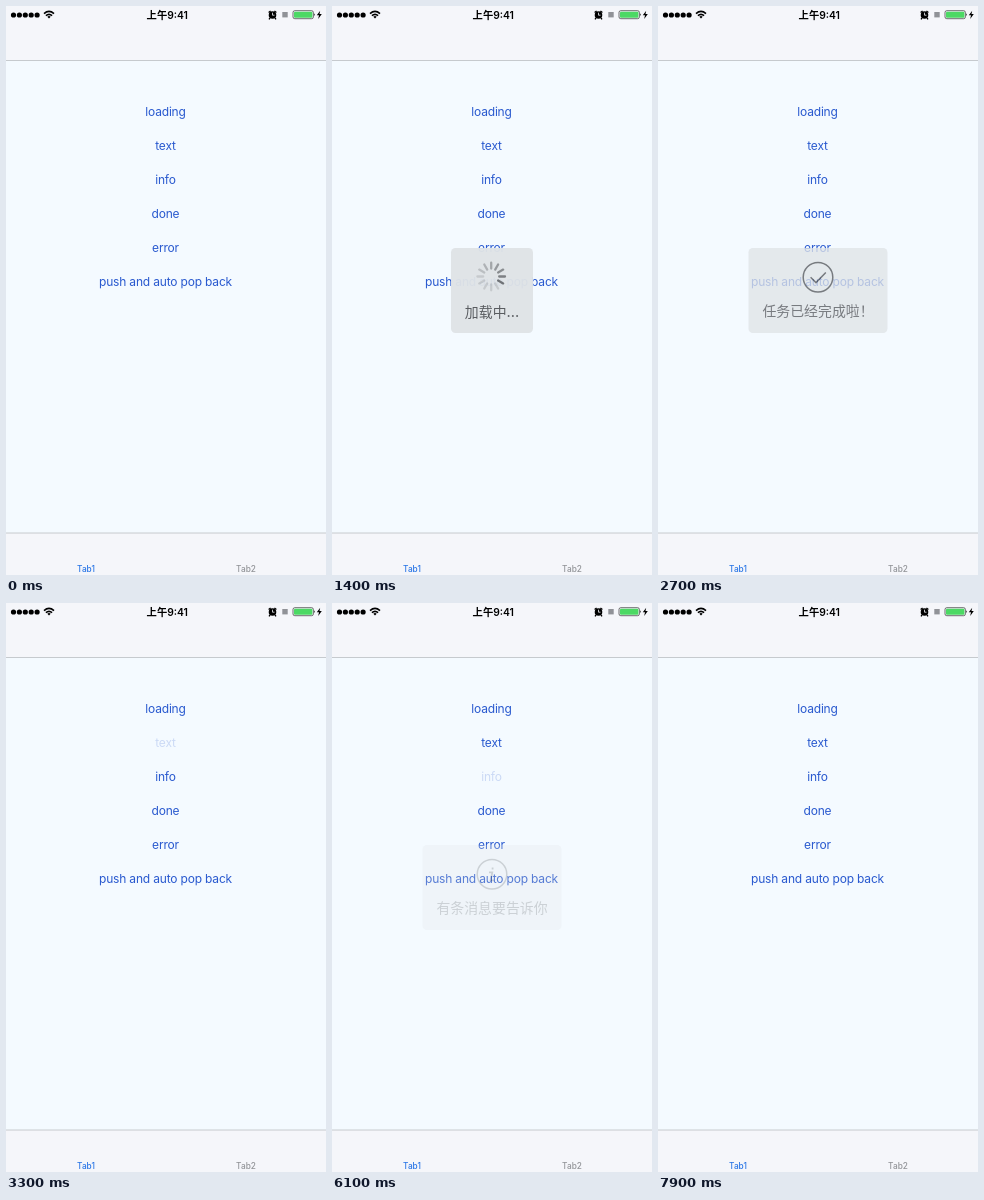
These frames come from a looping animation (320 px wide and 569 px high, 8000 ms). An HTML page:

```html
<!DOCTYPE html>
<html lang="zh">
<head>
<meta charset="utf-8">
<title>Toast demo</title>
<style>
html, body { margin: 0; height: 100%; overflow: hidden; background: #f4faff; }
svg { display: block; width: 100vw; height: 100vh; }
text { font-family: Inter, "Noto Sans CJK SC", "Noto Sans CJK", sans-serif; text-anchor: middle; }
#rows text { font-size: 12px; letter-spacing: -.18px; fill: #2959cf; }
.tab { font-size: 8.3px; font-weight: 500; }
.hud { opacity: 0; }
.hud > rect { fill: #dfe3e7; fill-opacity: .96; }
.hud text { font-size: 13.9px; font-weight: 500; fill: #595c60; }
.hud .plain { font-size: 13.1px; font-weight: 600; }
.icon { fill: none; stroke: #595c60; stroke-width: 1.5; }
#spinner line { stroke: #55585c; stroke-width: 2.3; stroke-linecap: round; }
</style>
</head>
<body>
<svg viewBox="0 0 320 569" preserveAspectRatio="none">
  <rect width="320" height="569" fill="#f4faff"/>
  <path d="M0 0H320V54H0zM0 527H320V569H0z" fill="#f5f6fa"/>
  <path d="M0 54.5H320M0 527H320" stroke="#c6cace"/>

  <!-- status bar -->
  <path d="M7.5 9H32" stroke="#000" stroke-width="5.2" stroke-linecap="round" stroke-dasharray="0 5.9"/>
  <g fill="none" stroke="#000" stroke-width="1.6">
    <path d="M38 7.6Q43 3.2 48 7.6M39.9 9.7Q43 7 46.1 9.7"/>
    <path d="M41.3 10.8Q43 9.4 44.7 10.8L43 12.6z" fill="#000" stroke="none"/>
  </g>
  <text x="161.3" y="12.5" font-size="10.3" font-weight="600">上午9:41</text>
  <circle cx="266.5" cy="9" r="3.8"/>
  <path d="M262.6 6.6L264.6 5M270.4 6.6L268.4 5M264 12L263 13.3M269 12L270 13.3" stroke="#000" stroke-width="1.3"/>
  <path d="M266.5 6.7V9.2H268.5" fill="none" stroke="#f5f6fa" stroke-width=".8"/>
  <rect x="276.3" y="6" width="5.4" height="5.4" fill="#909297"/>
  <rect x="287" y="4.7" width="20.4" height="8" rx="1.8" fill="none" stroke="#333" stroke-width=".7"/>
  <rect x="288" y="5.7" width="18.4" height="6" rx=".9" fill="#4cd964"/>
  <path d="M308.3 7.3Q309.8 8.7 308.3 10.1z"/>
  <path d="M314.2 4.7L310.8 9.3H313L312.2 13L315.8 8.1H313.5z"/>

  <g id="rows"></g>
  <text class="tab" x="80" y="566" fill="#2a76e6">Tab1</text>
  <text class="tab" x="240" y="566" fill="#929498">Tab2</text>

  <g class="hud">
    <rect x="119" y="242" width="82" height="85" rx="4.5"/>
    <g id="spinner" transform="translate(159.2 270.5)"></g>
    <text x="160" y="310.5">加载中...</text>
  </g>
  <g class="hud">
    <rect x="90.5" y="242" width="139" height="85" rx="4.5"/>
    <g class="icon"><circle cx="160" cy="271.2" r="14.8"/><path d="M152.6 271.3L158 276.6L167.8 266.4"/></g>
    <text x="160" y="310">任务已经完成啦！</text>
  </g>
  <g class="hud">
    <rect x="105" y="263" width="110" height="43.5" rx="4.5"/>
    <text class="plain" x="160" y="289.3">Hello World!!</text>
  </g>
  <g class="hud">
    <rect x="90.5" y="242" width="139" height="85" rx="4.5"/>
    <g class="icon"><circle cx="160" cy="271.2" r="14.8"/><path d="M157 269.3H160.3L158.6 277.3H162M160.6 264.6V266.4" stroke-width="1.8"/></g>
    <text x="160" y="310">有条消息要告诉你</text>
  </g>
</svg>
<script>
const LOOP = 8000, FRAME = 100;
const $ = id => document.getElementById(id);

const labels = ['loading', 'text', 'info', 'done', 'error', 'push and auto pop back'];
$('rows').innerHTML = labels.map((s, i) =>
  `<text x="159.5" y="${109.6 + 34.13 * i}">${s}</text>`).join('');
$('spinner').innerHTML = Array.from({ length: 12 }, (_, i) =>
  `<line y1="-8" y2="-13.8" transform="rotate(${i * 30})"/>`).join('');

const rows = [...$('rows').children];
const spokes = [...$('spinner').children];
const huds = [...document.querySelectorAll('.hud')];

// Fade-in start, fade-out start and fade-out length of each toast
const toasts = [[570, 1600, 200], [1570, 2620, 400], [3400, 4220, 400], [6000, 7020, 400]];
// Touch-down time and the toast start that releases the button
const presses = [[400, 570], [3300, 3400], [5900, 6000]];

const clamp = x => Math.min(1, Math.max(0, x));
const smooth = x => (x = clamp(x), x * x * (3 - 2 * x));

function render(t) {
  toasts.forEach(([start, end, length], i) => {
    huds[i].style.opacity = smooth((t - start) / 300) * (1 - clamp((t - end) / length));
  });
  presses.forEach(([down, start], i) => {
    rows[i].style.opacity = t < down ? 1 : .2 + .8 * smooth((t - start - 160) / 250);
  });
  const lead = 9 + Math.floor((t - 800) * 12 / 1000);
  spokes.forEach((spoke, i) => {
    const age = ((lead - i) % 12 + 12) % 12;
    spoke.style.opacity = Math.max(.18, .8 - age * .09);
  });
}

function tick() {
  let t = Math.floor(performance.now() % LOOP / FRAME) * FRAME;
  if (t > 500 && t < 800) t = 500; // the screen holds still before the first toast
  render(t);
  requestAnimationFrame(tick);
}
tick();
</script>
</body>
</html>
```
